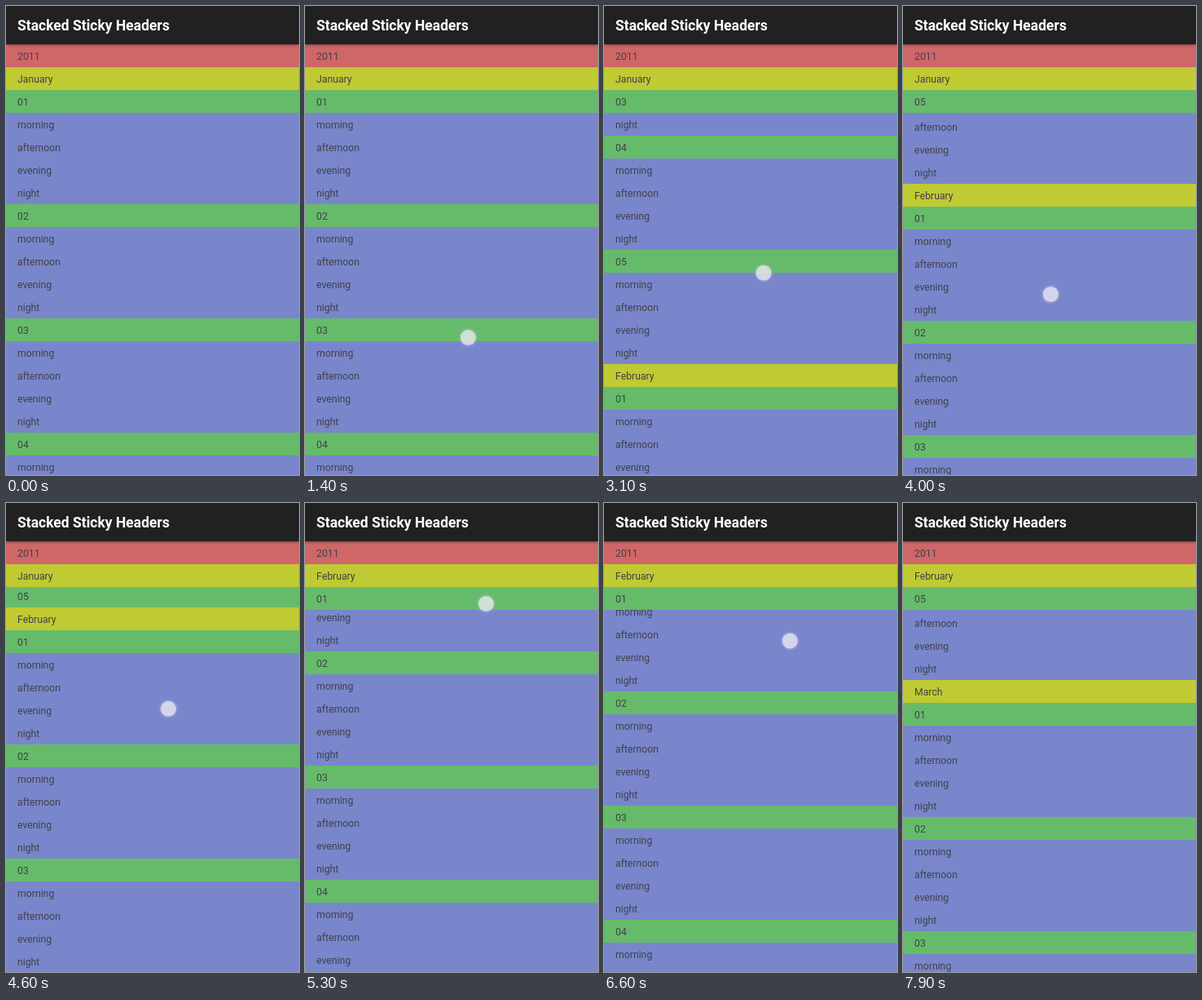
Write an HTML page that moves like this. It is 360 by 575 pixels and loops after 8000 ms.

```html
<!DOCTYPE html>
<html lang="en">
<head>
<meta charset="utf-8">
<title>Stacked Sticky Headers</title>
<style>
  html, body { margin: 0; width: 100%; height: 100%; overflow: hidden; }
  body { position: relative; background: #7986cb; font-family: Roboto, "Noto Sans", sans-serif; }
  h1 {
    position: absolute; z-index: 5; top: 0; left: 0; right: 0;
    box-sizing: border-box; height: 47px; margin: 0; padding-left: 14px;
    font-size: 17.5px; font-weight: 700; line-height: 48px;
    color: #fff; background: #212121;
    box-shadow: 0 1px 3px rgba(0, 0, 0, .4);
  }
  #list { position: absolute; top: 47px; left: 0; right: 0; bottom: 0; overflow: hidden; }
  .row {
    box-sizing: border-box; height: 28px; padding: 1px 0 0 14px;
    font-size: 12.25px; line-height: 28px; color: #41414a; background: #7986cb;
  }
  .year, .month, .day { position: sticky; }
  .year { top: 0; z-index: 3; background: #cf6667; }
  .month { top: 28px; z-index: 2; background: #c0ca33; }
  .day { top: 56px; z-index: 1; background: #66bb6a; }
  #touch {
    position: absolute; z-index: 6; top: -9.5px; left: -9.5px;
    width: 19px; height: 19px; border-radius: 50%;
    background: rgba(238, 236, 242, .78);
    box-shadow: 0 0 2px 1.5px rgba(190, 190, 235, .4);
  }
</style>
</head>
<body>
<h1>Stacked Sticky Headers</h1>
<div id="list"></div>
<div id="touch"></div>
<script>
  const LOOP = 8000, STEP = 100;
  const list = document.getElementById('list');
  const touch = document.getElementById('touch');

  const row = (text, kind = '') => `<div class="row ${kind}">${text}</div>`;
  const section = (text, kind, body) => `<section>${row(text, kind)}${body}</section>`;

  const parts = ['morning', 'afternoon', 'evening', 'night'].map(p => row(p)).join('');
  const days = ['01', '02', '03', '04', '05'].map(d => section(d, 'day', parts)).join('');
  const months = ['January', 'February', 'March'].map(m => section(m, 'month', days)).join('');
  list.innerHTML = section('2011', 'year', months);

  // Each swipe scrolls the list by some pixels; the finger moves a to b and may lift early
  const swipes = [
    { start: 1400, end: 2400, by: 258, a: [200, 406], b: [206, 150], lift: 2000 },
    { start: 2600, end: 3900, by: 327, a: [195, 430], b: [197, 110], lift: 3300 },
    { start: 4000, end: 5300, by: 204, a: [181, 353], b: [222, 123] },
    { start: 5300, end: 6100, by: -99, a: [222, 123], b: [228, 218] },
    { start: 6100, end: 7100, by: 100, a: [228, 218], b: [228, 119] },
    { start: 7400, end: 8400, by: 1048, a: [200, 430], b: [208, -610], lift: 7700 }
  ];

  const ease = k => (1 - Math.cos(Math.PI * k)) / 2;
  const progress = (s, t) => ease(Math.min(1, Math.max(0, (t - s.start) / (s.end - s.start))));
  const mix = (a, b, k) => a + (b - a) * k;

  function draw() {
    const t = Math.floor(performance.now() % LOOP / STEP) * STEP;
    list.scrollTop = Math.round(swipes.reduce((sum, s) => sum + s.by * progress(s, t), 0));

    const held = swipes.find(s => t >= s.start && t <= (s.lift || s.end));
    touch.style.visibility = held ? 'visible' : 'hidden';
    if (held) {
      const [x, y] = held.a.map((v, i) => mix(v, held.b[i], progress(held, t)));
      touch.style.transform = `translate(${x}px, ${y}px)`;
    }
    requestAnimationFrame(draw);
  }
  draw();
</script>
</body>
</html>
```
